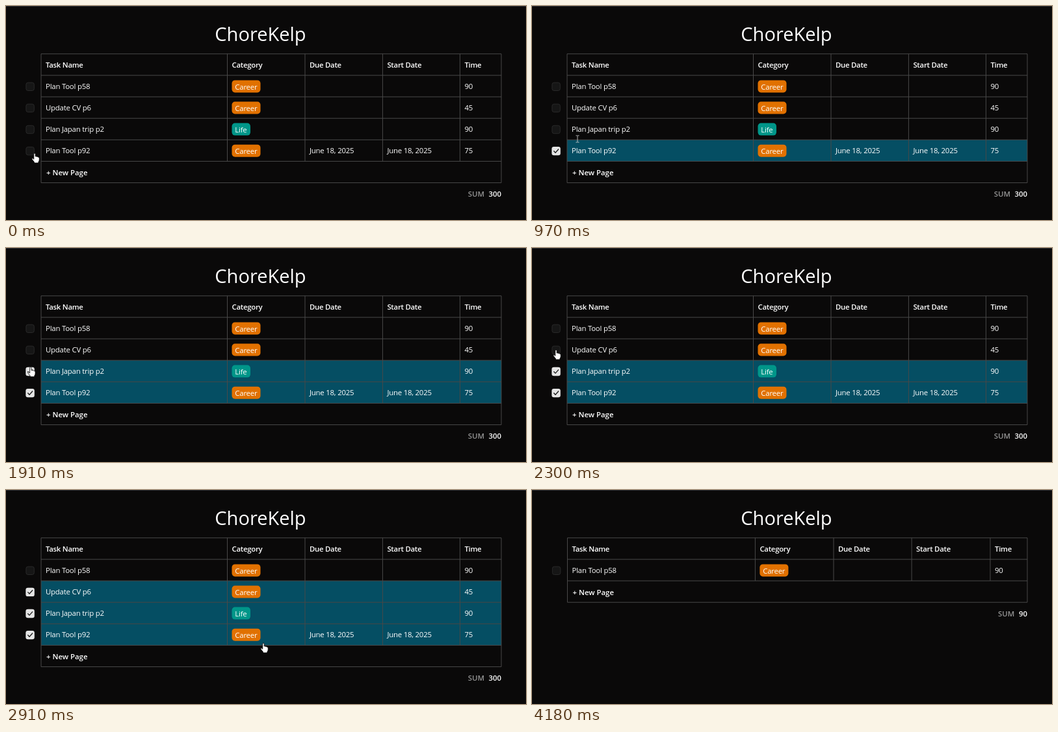
An HTML page for the animation above (4210 ms loop, 800 by 330 pixels).

```html
<!DOCTYPE html>
<html lang="en">
<head>
<meta charset="utf-8">
<title>ChoreKelp</title>
<style>
html, body { margin: 0; width: 100%; height: 100%; overflow: hidden; background: #0a0909; }
svg { display: block; }
text { font: 500 11.4px "Open Sans", "Noto Sans", sans-serif; letter-spacing: -.22px; fill: #fff; white-space: pre; }
.bold, .wide { font-weight: 600; letter-spacing: -.28px; }
.wide { letter-spacing: 0; }
.title { font-size: 29px; font-weight: 400; letter-spacing: 0; text-anchor: middle; }
.end { text-anchor: end; }
.dim { fill: #959595; }
.grid { fill: none; stroke: #494949; }
.row { fill: #054e63; }
.box { fill: #161616; stroke: #292929; }
.tick rect { fill: #e5e5e5; }
.tick path { fill: none; stroke: #171717; stroke-width: 1.3; stroke-linecap: round; stroke-linejoin: round; }
.cursor { fill: #fff; stroke: #000; stroke-width: .8; stroke-linejoin: round; }
</style>
</head>
<body>
<svg id="stage" width="800" height="330" viewBox="0 0 800 330"></svg>
<script>
const LOOP = 4210, DELETED = 4180, GONE = 4030;
const HEAD = ["Task Name", "Category", "Due Date", "Start Date", "Time"];
const TASKS = [
  ["Plan Tool p58", "Career", "", "", 90],
  ["Update CV p6", "Career", "", "", 45],
  ["Plan Japan trip p2", "Life", "", "", 90],
  ["Plan Tool p92", "Career", "June 18, 2025", "June 18, 2025", 75]
];
const BADGES = { Career: ["#e17100", 44], Life: ["#009689", 28.5] };
const CHECKED_AT = [Infinity, 2400, 1700, 560];
// time, x, y of the pointer's hot spot
const PATH = [
  [0, 44, 227], [30, 44, 227], [270, 38, 226], [640, 38, 226], [970, 70, 205],
  [1060, 72, 204], [1500, 38, 189], [1800, 38, 189], [2220, 37, 157], [2480, 37, 157],
  [2910, 396, 236], [3240, 405, 299], [3450, 405, 309], [3830, 405, 309], [GONE, 408, 333]
];

const lineY = i => 73.8 + 33.13 * i;
const midY = i => 91 + 33.1 * i;
const text = (x, y, str, cls = "") => `<text x="${x}" y="${y}" class="${cls}">${str}</text>`;

function badge(x, y, name) {
  const [color, width] = BADGES[name];
  return `<rect x="${x}" y="${y - 9.5}" width="${width}" height="19" rx="4.8" fill="${color}"/>` +
    text(x + 4.8, y + 5, name);
}

function table(id, xs, tasks, sumX) {
  const n = tasks.length, last = xs[5], bottom = lineY(n + 2);
  let fills = "", cells = "", boxes = "";
  HEAD.forEach((name, c) => cells += text(xs[c] + 7, midY(0) + 4, name, "bold"));
  tasks.forEach((task, r) => {
    const y = midY(r + 1), top = lineY(r + 1), left = xs[0] - 23.6;
    fills += `<rect class="row" x="${xs[0]}" y="${top}" width="${last - xs[0]}" height="${lineY(r + 2) - top}" opacity="0"/>`;
    task.forEach((value, c) => cells += c == 1
      ? badge(xs[c] + 7, y - .2, value)
      : text(xs[c] + 7, y + 4, value));
    boxes += `<rect class="box" x="${left + .5}" y="${y - 6}" width="12.4" height="12.4" rx="3"/>
      <g class="tick" visibility="hidden"><rect x="${left}" y="${y - 6.5}" width="13.4" height="13.4" rx="3.2"/>
      <path d="M${left + 3.3} ${y + .4}l2.3 2.4 4.7-5.2"/></g>`;
  });
  let lines = `M${xs[0]} ${lineY(0)}H${last}V${bottom}H${xs[0]}Z`;
  for (let i = 1; i < n + 2; i++) lines += `M${xs[0]} ${lineY(i)}H${last}`;
  for (const x of xs.slice(1, 5)) lines += `M${x} ${lineY(0)}V${lineY(n + 1)}`;
  const sum = tasks.reduce((total, task) => total + task[4], 0);
  return `<g id="${id}">${fills}<path class="grid" d="${lines}"/>${cells}${boxes}` +
    text(xs[0] + 8, midY(n + 1) + 4.5, "+ New Page", "wide") +
    text(sumX, bottom + 21.5, "SUM", "end dim wide") +
    text(last, bottom + 21.5, sum, "end wide") + "</g>";
}

const stage = document.getElementById("stage");
stage.innerHTML = `<rect width="800" height="1" fill="#2a2d32"/>` +
  text(391.5, 54, "ChoreKelp", "title") +
  table("full", [54, 340.5, 460, 579.4, 698.4, 762], TASKS, 736) +
  table("rest", [54.5, 343.4, 464, 584.1, 705, 762], TASKS.slice(0, 1), 742.2) +
  `<g id="pointer">
    <path id="arrow" class="cursor" d="M0 0V11L2.6 8.7 4.3 12.4 6 11.6 4.4 8H7.9Z"/>
    <path id="hand" class="cursor" d="M-1.2 .8Q0-.8 1.2 .8V5Q2.4 4.3 3.3 5.4 4.6 4.8 5.3 6 7.2 5.7 7.2 7.6V10.4Q7 12.4 5.9 13.4V15H-.6V13.6L-4.1 9.2Q-4.4 7.4-2.8 7.8L-1.2 9.3Z"/>
    <path id="beam" fill="none" stroke="#c8c8c8" stroke-width=".9" d="M-2.5-5.2H-.8L0-4.6 .8-5.2H2.5M0-4.6V4.6M-2.5 5.2H-.8L0 4.6 .8 5.2H2.5"/>
  </g>`;

const get = id => document.getElementById(id);
const show = (el, on) => el.setAttribute("visibility", on ? "visible" : "hidden");
const rows = document.querySelectorAll("#full .row");
const ticks = document.querySelectorAll("#full .tick");

function pointerAt(t) {
  const i = PATH.findIndex(key => key[0] > t);
  const [t0, x0, y0] = PATH[i - 1], [t1, x1, y1] = PATH[i];
  const u = (t - t0) / (t1 - t0), e = u * u * (3 - 2 * u);
  return [x0 + (x1 - x0) * e, y0 + (y1 - y0) * e];
}

function shapeAt(x, y) {
  const overBox = x > 29 && x < 46 && TASKS.some((_, r) => Math.abs(y - midY(r + 1)) < 8);
  const overNew = x > 54 && y > 232 && y < 273;
  if (overBox || overNew) return "hand";
  return x > 60 && x < 340 && y < 232 ? "beam" : "arrow";
}

function draw() {
  const t = performance.now() % LOOP, deleted = t >= DELETED;
  get("full").style.display = deleted ? "none" : "";
  get("rest").style.display = deleted ? "" : "none";
  CHECKED_AT.forEach((at, r) => {
    rows[r].setAttribute("opacity", Math.max(0, Math.min(1, (t - at) / 120)));
    show(ticks[r], t >= at && !deleted);
  });
  get("pointer").style.display = t < GONE ? "" : "none";
  if (t < GONE) {
    const [x, y] = pointerAt(t), shape = shapeAt(x, y);
    get("pointer").setAttribute("transform", `translate(${x} ${y})`);
    for (const id of ["arrow", "hand", "beam"]) show(get(id), id == shape);
  }
  requestAnimationFrame(draw);
}
draw();
</script>
</body>
</html>
```
